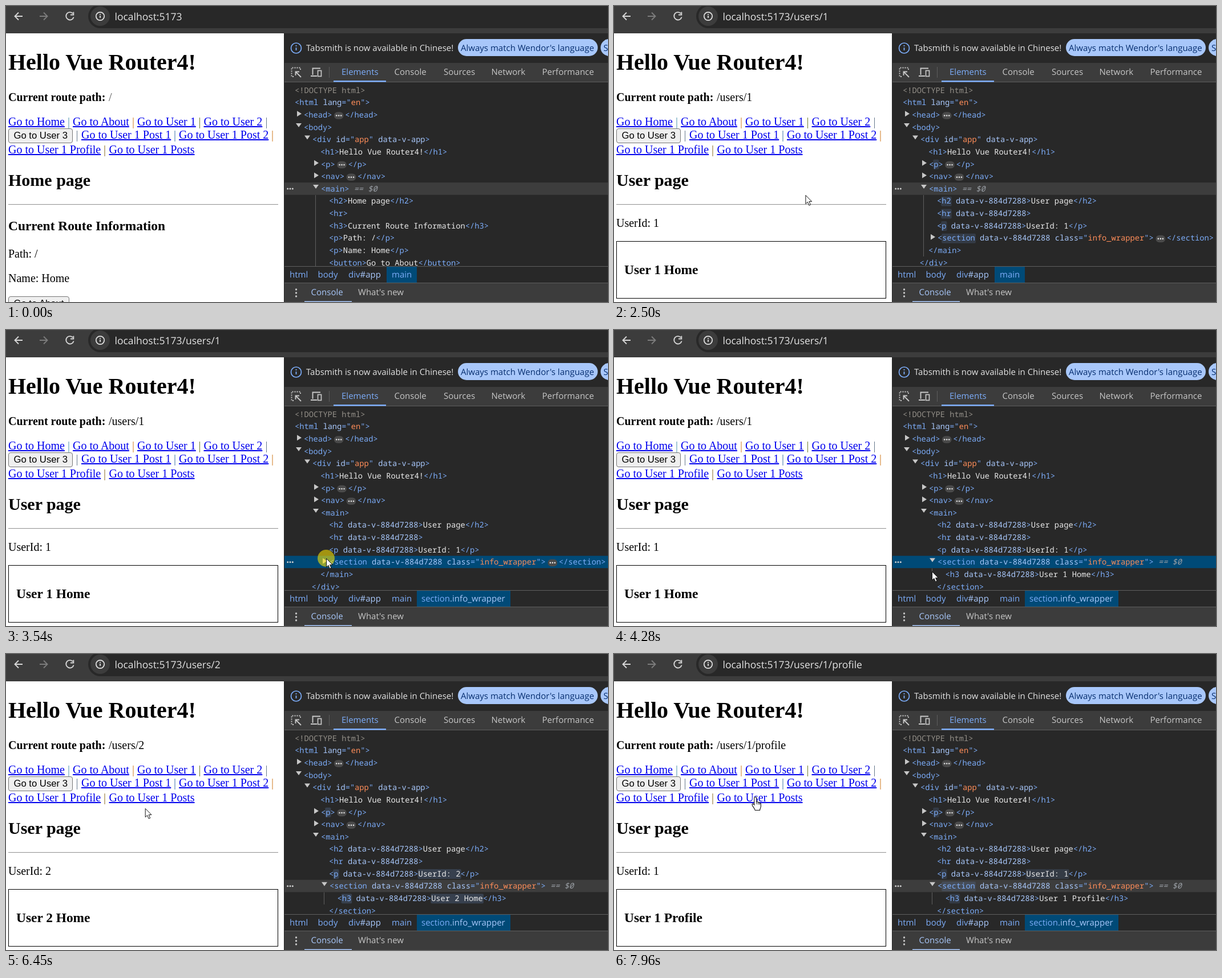
An HTML page that plays this animation: 1055 px wide and 520 px high, repeating every 8 s.

```html
<!DOCTYPE html>
<html lang="en">
<head>
<meta charset="utf-8">
<title>Vue Router demo</title>
<style>
html, body { margin: 0; width: 100%; height: 100%; overflow: hidden; background: #282828; }
svg { display: block; }
text { white-space: pre; }
.serif { font: 20px "Liberation Serif", serif; }
.bold { font-weight: 700; }
.link { fill: #0000ee; text-decoration: underline; }
.btn { font: 16.67px "Liberation Sans", sans-serif; }
.ui { font: 15px "Open Sans", "Noto Sans", sans-serif; text-rendering: geometricPrecision; }
.code { font: 13.73px "Noto Sans Mono", "DejaVu Sans Mono", monospace; text-rendering: geometricPrecision; }
.tag { fill: #7cacf8; }
.attr { fill: #a8c7fa; }
.val { fill: #fe8d59; }
.txt { fill: #e8e8e8; }
.dim { fill: #938f88; }
.ref { fill: #9a9fa5; font-style: italic; }
</style>
</head>
<body>
<script>
const NS = 'http://www.w3.org/2000/svg';
const LOOP = 8000, CHAR = 8.24, BADGE = 22.7, FADE = 1250;

function el(parent, name, attrs = {}, text) {
  const e = document.createElementNS(NS, name);
  for (const k in attrs) e.setAttribute(k, attrs[k]);
  if (text !== undefined) e.textContent = text;
  return parent.appendChild(e);
}
const rect = (g, x, y, width, height, fill, more) =>
  el(g, 'rect', { x, y, width, height, fill, ...more });
const path = (g, d, stroke, w = 1.6, more) =>
  el(g, 'path', { d, stroke, 'stroke-width': w, fill: 'none', ...more });
const dot = (g, cx, cy, r, fill, more) => el(g, 'circle', { cx, cy, r, fill, ...more });
const ui = (g, x, y, s, fill = '#c7c7c7', size = 15) =>
  el(g, 'text', { x, y, class: 'ui', fill, style: `font-size:${size}px` }, s);
const serif = (g, x, y, s, size = 20, cls = '') =>
  el(g, 'text', { x, y, class: 'serif ' + cls, style: `font-size:${size}px` }, s);
const dots = (g, cx, cy, gap, r, fill) =>
  [-1, 0, 1].forEach(i => dot(g, cx + i * gap, cy, r, fill));

const svg = el(document.body, 'svg', { width: 1055, height: 520, viewBox: '0 0 1055 520' });

// ---------- page ----------
const LINKS = [
  ['Go to Home', 4, 210, 99], ['Go to About', 117, 210, 99], ['Go to User 1', 230, 210, 102],
  ['Go to User 2', 346.5, 210, 102], ['Go to User 1 Post 1', 132, 233, 156],
  ['Go to User 1 Post 2', 303, 233, 157], ['Go to User 1 Profile', 4, 259, 162],
  ['Go to User 1 Posts', 180.5, 259, 150]
];
const BARS = [
  [108, 210, '#4a8fae'], [221, 210, '#cf7a1e'], [337.5, 210, '#6f7a2c'], [454.5, 210, '#66788c'],
  [122.5, 233, '#66788c'], [294, 233, '#3a6fa8'], [465, 233, '#cf7a1e'], [171, 259, '#8a6a20']
];

function button(g, x, y, w, label) {
  rect(g, x + .5, y + .5, w - 1, 25, '#efefef', { rx: 3.5, stroke: '#767676' });
  el(g, 'text', { x: x + 9.5, y: y + 18, class: 'btn' }, label);
}

function drawPage(g) {
  rect(g, 0, 48, 487, 472, '#fff');
  serif(g, 4, 112, 'Hello Vue Router4!', 40, 'bold');
  serif(g, 4, 167, 'Current route path:', 20, 'bold');
  for (const [s, x, y] of LINKS) serif(g, x, y, s, 20, 'link');
  for (const [x, y, fill] of BARS) serif(g, x, y, '|').setAttribute('fill', fill);
  button(g, 4, 215, 113, 'Go to User 3');
  rect(g, 4, 348, 473, 1, '#9a9a9a');
  rect(g, 4, 349, 473, 1, '#eee');
}

function homeView(g) {
  serif(g, 180, 167, '/').setAttribute('fill', '#555');
  serif(g, 4, 316, 'Home page', 30, 'bold');
  serif(g, 4, 394, 'Current Route Information', 23.4, 'bold');
  serif(g, 4, 442, 'Path: /');
  serif(g, 4, 485, 'Name: Home');
  button(g, 4, 510, 107, 'Go to About');
}

function userView(g, route, id, title) {
  serif(g, 180, 167, route);
  serif(g, 4, 316, 'User page', 30, 'bold');
  serif(g, 4, 388, 'UserId: ' + id);
  rect(g, 4.5, 413.5, 472, 100, 'none', { stroke: '#000' });
  serif(g, 18, 471, title, 23.4, 'bold');
}

// ---------- element tree ----------
const rowY = i => 148 + 21.64 * i;

function span(t, cls, s) { el(t, 'tspan', { class: cls }, s); }

function codeRow(g, i, [x, src, fold]) {
  const cy = rowY(i);
  if (fold) {
    el(g, 'path', {
      fill: '#c7c7c7',
      d: fold === 1 ? `M${x - 12} ${cy - 7}l8 5 -8 5z` : `M${x - 14} ${cy - 7}h10l-5 7z`
    });
  }
  src.split('…').forEach((part, n) => {
    if (n) {
      rect(g, x + 3.5, cy - 5, 16.5, 12.5, '#4a4a4a', { rx: 6 });
      dots(g, x + 11.8, cy + 1.2, 4, 1.3, '#e3e3e3');
      x += BADGE;
    }
    const t = el(g, 'text', { x, y: cy + 4.7, class: 'code' });
    for (const bit of part.split(/(<[^>]*>)/)) {
      if (!bit) continue;
      if (bit.startsWith('<!')) span(t, 'dim', bit);
      else if (bit[0] !== '<') span(t, bit.startsWith(' ==') ? 'ref' : 'txt', bit);
      else for (const s of bit.match(/(?<=")[^"=> ]+(?=")|\s[\w-]+|[<\/\w]+|./g))
        span(t, s[0] === ' ' ? 'attr' : /(?<=")\w/.test('"' + s) && !s.startsWith('<') ? 'val' : 'tag', s);
    }
    x += part.length * CHAR;
  });
}

const HEAD = [
  [506, '<!DOCTYPE html>'], [506, '<html lang="en">'], [522, '<head>…</head>', 1],
  [522, '<body>', 2], [537, '<div id="app" data-v-app>', 2], [551, '<h1>Hello Vue Router4!</h1>'],
  [552, '<p>…</p>', 1], [552, '<nav>…</nav>', 1]
];
const REF = ' == $0', V = 'data-v-884d7288';
const homeRows = () => [
  [552, '<main>' + REF, 2], [566, '<h2>Home page</h2>'], [566, '<hr>'],
  [566, '<h3>Current Route Information</h3>'], [566, '<p>Path: /</p>'],
  [566, '<p>Name: Home</p>'], [566, '<button>Go to About</button>']
];
const userRows = (id, title, mainRef) => [
  [552, '<main>' + (mainRef ? REF : ''), 2], [566, `<h2 ${V}>User page</h2>`], [566, `<hr ${V}>`],
  [566, `<p ${V}>UserId: ${id}</p>`],
  ...(title
    ? [[567, `<section ${V} class="info_wrapper">${REF}`, 2],
       [580.5, `<h3 ${V}>${title}</h3>`], [566, '</section>']]
    : [[567, `<section ${V} class="info_wrapper">…</section>`, 1],
       [551, '</main>'], [535.5, '</div>']])
];

// ---------- scenes ----------
// marks: [row, first character, length]
const SCENES = [
  { at: 0, url: '', rows: homeRows(), sel: 8, guide: [542.5, 457], view: homeView },
  { at: 1690, url: '/users/1', rows: userRows(1, '', true), sel: 8, guide: [542.5, 440], name: 'User 1 Home',
    marks: [[6, 1, 1], [9, 1, 2], [10, 1, 2], [11, 1, 1], [12, 1, 7]] },
  { at: 3540, url: '/users/1', rows: userRows(1, ''), sel: 12, focus: true, name: 'User 1 Home' },
  { at: 3610, url: '/users/1', rows: userRows(1, 'User 1 Home'), sel: 12, focus: true,
    guide: [557.5, 440], name: 'User 1 Home' },
  { at: 5760, url: '/users/2', rows: userRows(2, 'User 2 Home'), sel: 12, guide: [557.5, 440],
    name: 'User 2 Home', marks: [[6, 1, 1], [11, 1, 1], [11, 19, 9], [13, 1, 2], [13, 20, 11]] },
  { at: 7140, url: '/users/1/profile', rows: userRows(1, 'User 1 Profile'), sel: 12, guide: [557.5, 440],
    name: 'User 1 Profile', marks: [[6, 1, 1], [11, 1, 1], [11, 19, 9], [12, 1, 7], [13, 1, 2]] }
];

function drawScene(s) {
  const g = el(svg, 'g'), rows = [...HEAD, ...s.rows];
  ui(g, 190.5, 25, 'localhost:5173' + s.url, '#e3e3e3', 17.5);
  if (s.view) s.view(g);
  else userView(g, s.url, s.url[7], s.name);

  const cy = rowY(s.sel);
  rect(g, 488, cy - 11, 567, 21.6, s.focus ? '#004a77' : '#3d3d3d');
  dots(g, 498, cy, 4.3, 1.5, '#d0d0d0');
  if (s.guide) path(g, `M${s.guide[0]} ${cy + 11}V${s.guide[1]}`, '#5e5e5e', 1);
  s.flash = el(g, 'g', { opacity: 0 });
  for (const [i, from, n] of s.marks || [])
    rect(s.flash, rows[i][0] + from * CHAR - 1, rowY(i) - 8, n * CHAR + 2, 17, '#7cacf8', { rx: 2 });
  rows.forEach((r, i) => codeRow(g, i, r));

  // breadcrumbs
  rect(g, 488, 457, 567, 30, '#282828');
  rect(g, 488, 457, 567, 1, '#5e5e5e');
  const inSection = s.sel === 12;
  rect(g, inSection ? 720 : 667, 458, inSection ? 164 : 53, 28, '#004a77');
  ui(g, 497, 477, 'html', '#7cacf8');
  ui(g, 546.5, 477, 'body', '#7cacf8');
  const div = ui(g, 600, 477, '', '#7cacf8');
  span(div, 'tag', 'div');
  span(div, 'attr', '#app');
  ui(g, 676, 477, 'main', '#7cacf8');
  if (inSection) {
    const c = ui(g, 728, 477, '');
    span(c, 'tag', 'section');
    span(c, 'attr', '.info_wrapper');
  }
  rect(g, 488, 486, 567, 1, '#5e5e5e');
  s.g = g;
}

// ---------- browser frame ----------
function infoIcon(g, x, y, r, color) {
  dot(g, x, y, r, 'none', { stroke: color, 'stroke-width': 1.7 });
  rect(g, x - .9, y - 1, 1.8, r * .55, color);
  dot(g, x, y - r * .45, 1.1, color);
}

function drawFrame(g) {
  rect(g, 0, 0, 1055, 48, '#3c3c3c');
  rect(g, 144, -3, 940, 42, '#282828', { rx: 21 });
  path(g, 'M29 18H16M22 11.5L15.5 18L22 24.5', '#d6d6d6', 1.9);
  path(g, 'M59 18H72M66 11.5L72.5 18L66 24.5', '#7c7c7c', 1.9);
  path(g, 'M117.2 13.2A6.8 6.8 0 1 0 118.6 19.5', '#d6d6d6', 1.9);
  path(g, 'M118.3 10.5V15.5H113', '#d6d6d6', 1.9);
  dot(g, 165, 18, 17, '#3c3c3c');
  infoIcon(g, 165, 18, 7.2, '#e3e3e3');

  rect(g, 487, 48, 568, 472, '#282828');
  infoIcon(g, 508.5, 74, 9, '#7cacf8');
  ui(g, 526, 79, 'Tabsmith is now available in Chinese!', '#e3e3e3');
  rect(g, 792, 58, 245, 30, '#a8c7fa', { rx: 15 });
  ui(g, 797, 79, 'Always match Wendor\'s language', '#062e6f');
  rect(g, 1042, 58, 60, 30, '#a8c7fa', { rx: 15 });
  ui(g, 1047, 79, 'S', '#062e6f');

  rect(g, 488, 100, 567, 34, '#3c3c3c');
  rect(g, 488, 133, 567, 1, '#5e5e5e');
  path(g, 'M516 112V108.5H500.5V124H505', '#c7c7c7', 1.8, { 'stroke-dasharray': '2 2' });
  path(g, 'M517 125L508 116M507.5 122V115.5H514', '#c7c7c7', 1.9);
  path(g, 'M551 109.5H537.5V121M534 123H545', '#c7c7c7', 1.9);
  rect(g, 546.5, 113.5, 6, 10, 'none', { stroke: '#c7c7c7', 'stroke-width': 1.7 });
  rect(g, 566, 107, 1, 19, '#5e5e5e');
  ui(g, 588, 121, 'Elements', '#7cacf8');
  rect(g, 574, 131, 92, 2.5, '#7cacf8');
  ui(g, 680.5, 121, 'Console');
  ui(g, 767, 121, 'Sources');
  ui(g, 850.5, 121, 'Network');
  ui(g, 939.5, 121, 'Performance');

  rect(g, 488, 487, 567, 33, '#3c3c3c');
  [498, 504, 510].forEach(y => dot(g, 508.5, y, 1.7, '#c7c7c7'));
  ui(g, 534.5, 508, 'Console', '#a8c7fa');
  rect(g, 523, 518.5, 83, 1.5, '#a8c7fa');
  ui(g, 617, 508, 'What\'s new');
}

drawFrame(svg);
drawPage(svg);
SCENES.forEach(drawScene);

// ---------- pointer ----------
const MOVES = [
  [520, 152, 484], [760, 262, 372], [960, 358, 262], [1100, 360, 214], [1280, 302, 211],
  [1350, 297, 207], [2100, 297, 207], [2500, 335, 332], [2920, 505, 345], [2990, 578, 345],
  [3400, 561, 401], [3680, 561, 401], [4280, 557, 424], [4810, 557, 424], [5220, 361, 203],
  [5970, 361, 203], [6450, 244, 271], [6930, 106, 253], [7350, 106, 253], [7830, 246, 255],
  [7960, 248, 253], [LOOP, 248, 253]
];
const CLICKS = [1550, 3540, 5690, 7070];

const pointer = el(svg, 'g');
const ring = dot(pointer, 0, 0, 15, '#ffe600', { opacity: .57 });
const arrow = el(pointer, 'path', {
  d: 'M.5 .5V15.6L3.9 12.3L6.4 18.2L9 17.1L6.5 11.4H11.2Z',
  fill: '#fff', stroke: '#111', 'stroke-width': 1
});
const hand = el(pointer, 'g');
el(hand, 'path', {
  d: 'M-2.2 .2C-2.2-2.4 1.8-2.4 1.8 .2V7.2C2.4 6 4.4 6.2 4.6 8C5.2 7 7 7.4 7.2 9' +
     'C8.2 8.4 9.4 9 9.4 10.6V14.5C9.4 17 7.6 18.5 7.6 21.5H-.8C-1 18.5-5.6 14.5-6 11.6C-6.2 9.8-4 9.4-2.2 12Z',
  fill: '#fff', stroke: '#111', 'stroke-width': 1.1
});
path(hand, 'M1.8 7V11M4.6 8V11.5M7.2 9V12', '#111', .9);

function place(t) {
  const k = MOVES.findIndex(m => m[0] > t);
  const [t0, x0, y0] = MOVES[k - 1], [t1, x1, y1] = MOVES[k];
  const p = (t - t0) / (t1 - t0);
  return [x0 + (x1 - x0) * p, y0 + (y1 - y0) * p];
}
const show = (e, on) => e.setAttribute('display', on ? 'inline' : 'none');

function render(t) {
  let cur = SCENES[0];
  for (const s of SCENES) if (t >= s.at) cur = s;
  for (const s of SCENES) show(s.g, s === cur);
  cur.flash.setAttribute('opacity', .4 * Math.max(0, 1 - (t - cur.at) / FADE));

  const visible = t >= MOVES[0][0];
  show(pointer, visible);
  if (!visible) return;
  const [x, y] = place(t);
  const over = LINKS.some(([, lx, ly, w]) => x >= lx && x <= lx + w && y > ly - 17 && y < ly + 5);
  pointer.setAttribute('transform', `translate(${x.toFixed(1)} ${y.toFixed(1)})`);
  show(hand, over);
  show(arrow, !over);
  show(ring, CLICKS.some(c => t >= c && t < c + 200));
}

const start = performance.now();
function tick() {
  render((performance.now() - start) % LOOP);
  requestAnimationFrame(tick);
}
tick();
</script>
</body>
</html>
```
